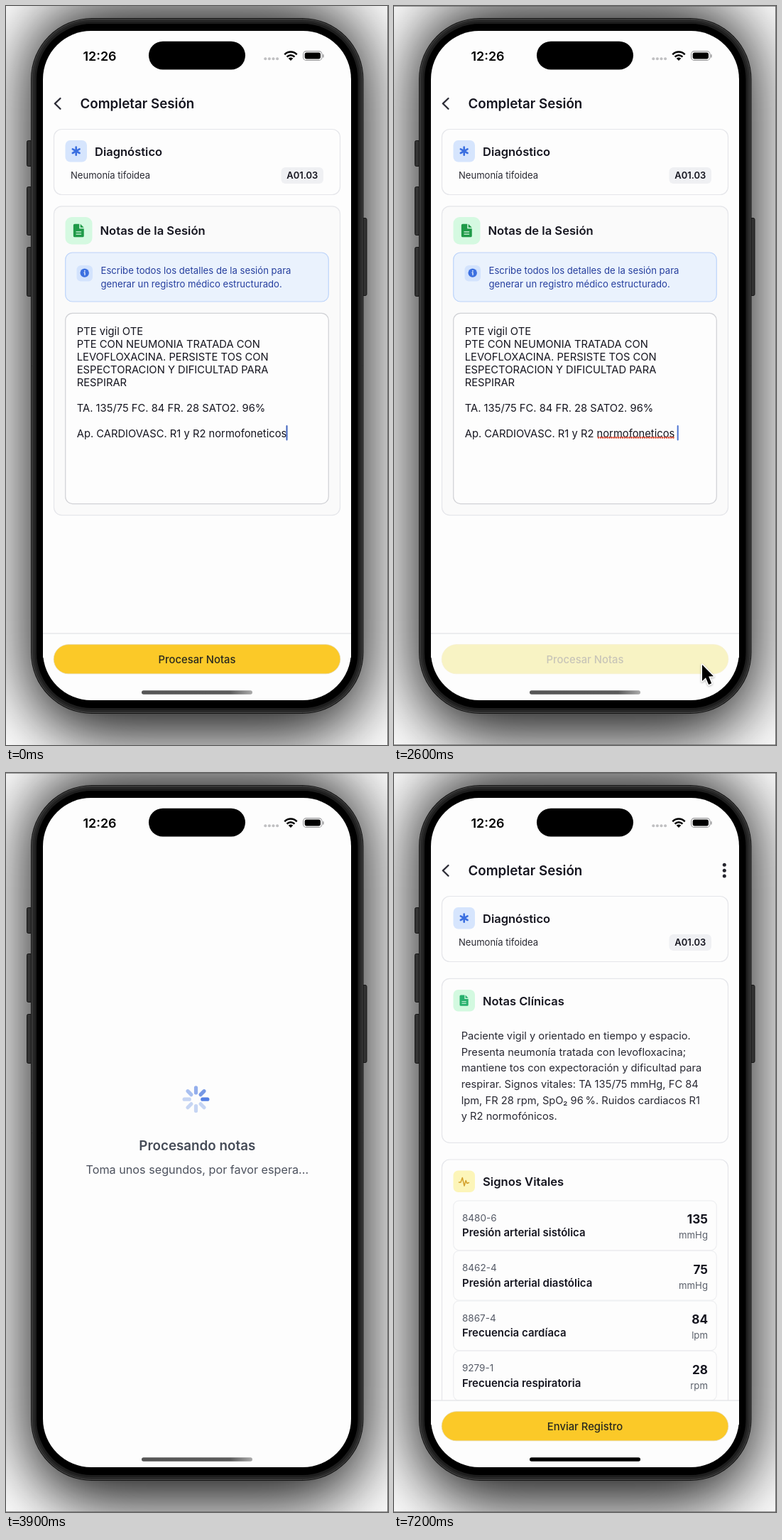
An HTML page with a canvas that plays this animation: 538x1040 px, repeating every 7.3 s.

```html
<!DOCTYPE html>
<html lang="es">
<head>
<meta charset="utf-8">
<title>Completar Sesión</title>
<style>
html, body { margin: 0; width: 100%; height: 100%; overflow: hidden; background: #fff; }
canvas { display: block; width: 538px; height: 1040px; }
</style>
</head>
<body>
<canvas id="stage" width="538" height="1040"></canvas>
<script>
const W = 538, H = 1040, LOOP = 7300;
const TIMES = { word: 1400, mouseIn: 1800, mouseStop: 2350, press: 2450, loading: 2700, result: 4100 };
const INK = '#15151f', BLUE = '#3b6fe0', LINE = '#e5e6ea', PAPER = '#fdfdfd';
const ctx = document.getElementById('stage').getContext('2d');
let c = ctx;

function box(x, y, w, h, r, fill, stroke, lw = 1.2) {
  c.beginPath();
  c.roundRect(x, y, w, h, r);
  if (fill) { c.fillStyle = fill; c.fill(); }
  if (stroke) { c.strokeStyle = stroke; c.lineWidth = lw; c.stroke(); }
}

function disc(x, y, r, fill) {
  c.beginPath();
  c.arc(x, y, r, 0, Math.PI * 2);
  c.fillStyle = fill;
  c.fill();
}

function path(points, color, width) {
  c.beginPath();
  points.forEach(([x, y], i) => i ? c.lineTo(x, y) : c.moveTo(x, y));
  c.strokeStyle = color;
  c.lineWidth = width;
  c.lineCap = c.lineJoin = 'round';
  c.stroke();
}

// cy is the middle of the capital letters
function text(str, x, cy, size, weight = 400, color = INK, align = 'left') {
  c.font = `${weight} ${size}px Inter, sans-serif`;
  c.textAlign = align;
  c.fillStyle = color;
  c.fillText(str, x, cy + size * 0.364);
}

function drawPhone() {
  c.fillStyle = '#fff';
  c.fillRect(0, 0, W, H);
  c.save();
  c.shadowColor = 'rgba(0,0,0,.95)';
  c.shadowBlur = 94;
  c.shadowOffsetX = 2000;
  box(31 - 2000, 1, 476, 1024, 100, '#000');
  c.restore();
  c.fillStyle = '#777';
  c.fillRect(537, 0, 1, H);

  for (const [x, y, h] of [[29, 189, 37], [29, 254, 69], [29, 339, 70], [501, 298, 110]])
    box(x + 0.5, y + 0.5, 6.5, h - 1, 2, '#333', '#151515', 1);
  box(35, 17, 468.5, 979, 86, '#111');
  box(36.5, 18.5, 465.5, 976, 84.5, '#292929', '#4b4b4b', 1);
  box(40.5, 22, 457.5, 969, 80, '#1d1d1d');
  box(43, 25, 452.5, 963, 78, '#000');
  box(52, 35, 434, 942, 68, PAPER);
  box(201, 49.7, 136, 39.8, 19.9, '#000');

  text('12:26', 132, 70, 17.9, 600, '#000', 'center');
  for (let i = 0; i < 4; i++) disc(365.3 + i * 5.6, 74.3, 2, '#c0c0c2');
  c.save();
  c.beginPath();
  c.moveTo(401, 77);
  c.lineTo(389, 65);
  c.lineTo(389, 55);
  c.lineTo(413, 55);
  c.lineTo(413, 65);
  c.clip();
  disc(401, 76.5, 4, '#000');
  c.strokeStyle = '#000';
  c.lineWidth = 2.5;
  for (const r of [7.3, 12]) {
    c.beginPath();
    c.arc(401, 76.5, r, 0, Math.PI * 2);
    c.stroke();
  }
  c.restore();
  box(418.6, 63.6, 26.4, 12.8, 4.2, null, '#9a9a9c', 1.1);
  box(420.7, 65.6, 22.3, 8.8, 2.6, '#000');
  box(446, 68, 1.7, 4.5, 1, '#a5a5a7');
}

function homeBar(dark) {
  let fill = '#000';
  if (!dark) {
    fill = c.createLinearGradient(191, 0, 347, 0);
    fill.addColorStop(0, '#555');
    fill.addColorStop(0.8, '#5b5b5b');
    fill.addColorStop(1, '#aaa');
  }
  box(191, 963.2, 156, 5.6, 2.8, fill);
}

function docIcon(cx, cy, s, color) {
  c.save();
  c.translate(cx, cy);
  c.scale(s, s);
  c.beginPath();
  c.moveTo(-6, -10);
  c.lineTo(1, -10);
  c.lineTo(1, -3);
  c.lineTo(8, -3);
  c.lineTo(8, 8);
  c.quadraticCurveTo(8, 10, 6, 10);
  c.lineTo(-6, 10);
  c.quadraticCurveTo(-8, 10, -8, 8);
  c.lineTo(-8, -8);
  c.quadraticCurveTo(-8, -10, -6, -10);
  c.moveTo(2.6, -10);
  c.lineTo(8, -4.5);
  c.lineTo(2.6, -4.5);
  c.fillStyle = color;
  c.fill();
  for (const y of [2, 5.4]) path([[-3.6, y], [3.6, y]], '#d9f8e3', 1.3);
  c.restore();
}

function header() {
  path([[76.5, 130], [68.8, 137.3], [76.5, 144.8]], '#2b2b35', 2.3);
  text('Completar Sesión', 104.5, 137.5, 18.75, 600);
  box(67.5, 173.5, 403, 92, 11, PAPER, LINE);
  box(83.5, 189, 30.5, 30.5, 7, '#d6e5fd');
  for (let i = 0; i < 3; i++) {
    const a = Math.PI / 2 + i * Math.PI / 3;
    const dx = Math.cos(a) * 5.6, dy = Math.sin(a) * 5.6;
    path([[98.7 - dx, 204.2 - dy], [98.7 + dx, 204.2 + dy]], BLUE, 2.6);
  }
  text('Diagnóstico', 125, 204.5, 16.5, 600);
  text('Neumonía tifoidea', 91, 238.5, 13.05, 400, '#292932');
  box(387.5, 227, 59.5, 23, 6, '#eff0f3');
  text('A01.03', 417.3, 238.5, 13, 600, INK, 'center');
}

function footer(label, pale) {
  c.fillStyle = PAPER;
  c.fillRect(52, 883, 434, 34);
  c.fillStyle = '#e4e5e8';
  c.fillRect(52, 882.4, 434, 1.3);
  box(67.2, 898.6, 403.6, 41.2, 20.6, pale ? '#f8f3c4' : '#fbc928', pale ? '#f6efd2' : '#e2d9b4', 0.7);
  text(label, 269, 919.2, 14.8, 500, pale ? '#c8c5b8' : '#29291f', 'center');
}

function notesScreen(t) {
  header();
  box(67.5, 281.8, 403, 434.8, 11, '#fafafa', LINE);
  box(83.5, 297, 38, 38.5, 9, '#d5f9e1');
  docIcon(102.3, 316, 0.93, '#1f9a48');
  text('Notas de la Sesión', 132.5, 316.3, 16.6, 600);

  box(83.7, 347, 370.6, 69, 10, '#eaf2fd', '#bdd4fa');
  box(99.5, 365, 22.5, 22.5, 6, '#d3e3fd');
  disc(110.7, 375.6, 6.2, BLUE);
  disc(110.9, 372.8, 0.9, '#fff');
  path([[110, 375.2], [111, 375.2], [111, 378.6]], '#fff', 1.2);
  text('Escribe todos los detalles de la sesión para', 133.5, 372.7, 13.15, 400, '#263f9e');
  text('generar un registro médico estructurado.', 133.5, 391.4, 13.15, 400, '#263f9e');

  box(83.7, 432.3, 370.6, 268.3, 10, PAPER, '#d0d1d5');
  const lines = ['PTE vigil OTE', 'PTE CON NEUMONIA TRATADA CON', 'LEVOFLOXACINA. PERSISTE TOS CON',
    'ESPECTORACION Y DIFICULTAD PARA', 'RESPIRAR', '', 'TA. 135/75 FC. 84 FR. 28 SATO2. 96%', '',
    'Ap. CARDIOVASC. R1 y R2 normofoneticos'];
  lines.forEach((line, i) => text(line, 99.7, 457.3 + i * 18, 14.75));

  const wordDone = t >= TIMES.word;
  if (wordDone) {
    for (let x = 288; x < 395; x += 3.1) disc(x, 607.4, 1.3, '#dc4b35');
  }
  box(wordDone ? 398.7 : 394.5, 590, 2, 21.5, 1, wordDone ? '#4f75d2' : '#3f62bd');
  footer('Procesar Notas', t >= TIMES.press);
  homeBar(false);
}

function loadingScreen(t) {
  const head = Math.floor((t - 3200) / 100) + 3;
  for (let i = 0; i < 8; i++) {
    const age = (((head - i) % 8) + 8) % 8;
    const a = i * Math.PI / 4, dx = Math.sin(a), dy = -Math.cos(a);
    const color = ['#5580e4', '#7798e5', '#93aeec', '#a9c0f0'][age] || '#c6d5f3';
    path([[267.5 + dx * 9.3, 459.2 + dy * 9.3], [267.5 + dx * 16.3, 459.2 + dy * 16.3]], color, 5.2);
  }
  text('Procesando notas', 269.3, 524, 18.8, 600, '#454b57', 'center');
  text('Toma unos segundos, por favor espera...', 269.3, 558.5, 16.2, 400, '#4d525e', 'center');
  homeBar(false);
}

function resultScreen() {
  header();
  for (const y of [129.3, 137.2, 145]) disc(465.3, y, 2.5, '#25252e');
  box(67.5, 289.3, 403, 231, 11, PAPER, LINE);
  box(83.5, 305, 30.5, 30.5, 7, '#d3f9e0');
  docIcon(98.6, 320.2, 0.76, '#27b06d');
  text('Notas Clínicas', 125, 320.5, 16.5, 600);
  ['Paciente vigil y orientado en tiempo y espacio.',
    'Presenta neumonía tratada con levofloxacina;',
    'mantiene tos con expectoración y dificultad para',
    'respirar. Signos vitales: TA 135/75 mmHg, FC 84',
    'lpm, FR 28 rpm, SpO₂ 96\u202f%. Ruidos cardiacos R1',
    'y R2 normofónicos.'
  ].forEach((line, i) => text(line, 94.7, 369.6 + i * 22.65, 14.7, 400, '#292933'));

  c.save();
  c.beginPath();
  c.rect(52, 530, 434, 353);
  c.clip();
  box(67.5, 544, 403, 500, 11, PAPER, LINE);
  box(83.5, 559.5, 30.5, 30.5, 7, '#fcf5b9');
  path([[91.5, 576], [94, 576], [96.3, 569.5], [99, 581], [101.2, 573.5], [102.8, 577.5], [105.5, 576.5]], '#d3a02c', 1.5);
  text('Signos Vitales', 125, 575, 16.6, 600);
  [['8480-6', 'Presión arterial sistólica', '135', 'mmHg'],
    ['8462-4', 'Presión arterial diastólica', '75', 'mmHg'],
    ['8867-4', 'Frecuencia cardíaca', '84', 'lpm'],
    ['9279-1', 'Frecuencia respiratoria', '28', 'rpm']
  ].forEach(([code, name, value, unit], i) => {
    const y = 601.8 + i * 70.5;
    box(83.7, y, 370.6, 69.8, 8, PAPER, '#eeeff1');
    text(code, 96, y + 24.2, 13.5, 400, '#555a66');
    text(name, 96, y + 45.2, 15, 600);
    text(value, 442, y + 26, 17.2, 700, INK, 'right');
    text(unit, 442, y + 48.5, 13.2, 400, '#5b606b', 'right');
  });
  c.restore();
  footer('Enviar Registro', false);
  homeBar(true);
}

function mouse(t) {
  const p = Math.min(1, (t - TIMES.mouseIn) / (TIMES.mouseStop - TIMES.mouseIn));
  const away = (1 - p) ** 3;
  c.save();
  c.translate(433 + 70 * away, 925 + 14 * away);
  c.beginPath();
  for (const [x, y] of [[1, 2], [1, 25], [6, 20.2], [10.2, 30], [14.2, 28.3], [10.2, 18.6], [17, 18.2]]) c.lineTo(x, y);
  c.closePath();
  c.shadowColor = 'rgba(0,0,0,.3)';
  c.shadowBlur = 3;
  c.shadowOffsetY = 1;
  c.lineJoin = 'round';
  c.lineWidth = 3;
  c.strokeStyle = '#fff';
  c.stroke();
  c.shadowColor = 'transparent';
  c.fillStyle = '#000';
  c.fill();
  c.restore();
}

const phone = document.createElement('canvas');
phone.width = W;
phone.height = H;
c = phone.getContext('2d');
drawPhone();
c = ctx;

function frame() {
  const t = performance.now() % LOOP;
  c.drawImage(phone, 0, 0);
  if (t >= TIMES.word) {
    c.fillStyle = 'rgba(90,90,90,.6)';
    c.fillRect(0, 0, W, 1);
    c.fillRect(0, H - 1, W, 1);
  }
  if (t < TIMES.loading) notesScreen(t);
  else if (t < TIMES.result) loadingScreen(t);
  else resultScreen();
  if (t >= TIMES.mouseIn && t < TIMES.loading) mouse(t);
  requestAnimationFrame(frame);
}
frame();
</script>
</body>
</html>
```
